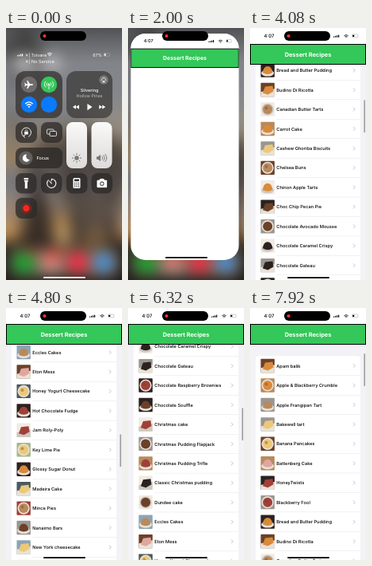
An HTML page that plays this animation: 146x316 px, repeating every 8 s.

```html
<!DOCTYPE html>
<html lang="en">
<head>
<meta charset="utf-8">
<title>Dessert Recipes</title>
<style>
  html, body { margin: 0; width: 100%; height: 100%; overflow: hidden; background: #444; }
  svg { display: block; width: 100vw; height: 100vh; }
  text { font-family: Inter, Roboto, sans-serif; text-rendering: geometricPrecision; }
</style>
</head>
<body>
<svg id="stage" viewBox="0 0 146 316"></svg>
<script>
const LOOP = 8000, STEP = 80, PITCH = 24.45;

// Name, then tile and food colours as letters of the palette.
const PALETTE = {
  k: '#2b2220', b: '#6b4128', t: '#b98a5c', o: '#d98a3a', y: '#ecc878', w: '#f0ebe4',
  g: '#9a9692', s: '#8ea4b4', r: '#a04038', p: '#e0a6a0', n: '#a8b88a', d: '#4a5a60'
};
const DESSERTS = `Apam balik bo;Apple & Blackberry Crumble to;Apple Frangipan Tart gt;Bakewell tart gy
Banana Pancakes by;Battenberg Cake tp;HoneyTwists kr;Blackberry Fool gr;Bread and Butter Pudding ko
Budino Di Ricotta bo;Canadian Butter Tarts wt;Carrot Cake to;Cashew Ghoriba Biscuits gy;Chelsea Buns bt
Chinon Apple Tarts wo;Choc Chip Pecan Pie kb;Chocolate Avocado Mousse gb;Chocolate Caramel Crispy wk
Chocolate Gateau gk;Chocolate Raspberry Brownies kr;Chocolate Souffle kb;Christmas cake wr
Christmas Pudding Flapjack gb;Christmas Pudding Trifle tr;Classic Christmas pudding wk;Dundee cake wb
Eccles Cakes st;Eton Mess bp;Honey Yogurt Cheesecake dy;Hot Chocolate Fudge kr;Jam Roly-Poly wr
Key Lime Pie ny;Glossy Sugar Donut ko;Madeira Cake dy;Mince Pies rt;Nanaimo Bars gb;New York cheesecake sy
Pancakes wo;Parkin Cake tb;Peach & Blueberry Grunt do;Peanut Butter Cheesecake by;Peanut Butter Cookies wt
Pear Tarte Tatin go;Portuguese Custard Tarts ky;Pumpkin Pie to;Rock Cakes wt`.split(/[;\n]/);

const rect = (x, y, w, h, r, fill, more = '') =>
  `<rect x="${x}" y="${y}" width="${w}" height="${h}" rx="${r}" fill="${fill}" ${more}/>`;
const dot = (x, y, r, fill, more = '') => `<circle cx="${x}" cy="${y}" r="${r}" fill="${fill}" ${more}/>`;
const oval = (x, y, rx, ry, fill) => `<ellipse cx="${x}" cy="${y}" rx="${rx}" ry="${ry}" fill="${fill}"/>`;
const path = (d, fill, more = '') => `<path d="${d}" fill="${fill}" ${more}/>`;
const line = (d, color = '#fff', w = .9) =>
  path(d, 'none', `stroke="${color}" stroke-width="${w}" stroke-linecap="round" stroke-linejoin="round"`);
const text = (x, y, s, size, fill, weight = 500, anchor = 'middle') =>
  `<text x="${x}" y="${y}" font-size="${size}" fill="${fill}" font-weight="${weight}" text-anchor="${anchor}">${s.replace('&', '&amp;')}</text>`;
const group = (id, body, more = '') => `<g id="${id}" ${more}>${body}</g>`;
const gradient = (id, stops) => `<linearGradient id="${id}" x2="0" y2="1">` +
  stops.map(([at, c, a = 1]) => `<stop offset="${at}" stop-color="${c}" stop-opacity="${a}"/>`).join('') +
  '</linearGradient>';

let seed = 11;
const rand = () => (seed = seed * 16807 % 2147483647) / 2147483647;

// Limbs are collected by depth, so each thickness is one path.
const limbs = Array(8).fill('');
function branch(x, y, angle, len, depth, spread = .4) {
  const x2 = x + Math.cos(angle) * len, y2 = y + Math.sin(angle) * len;
  limbs[depth] += `M${x.toFixed(1)} ${y.toFixed(1)}L${x2.toFixed(1)} ${y2.toFixed(1)}`;
  if (!depth) return;
  for (const turn of depth > 3 ? [-spread, 0, spread] : [-spread * .8, spread * .8]) {
    branch(x2, y2, angle + turn + (rand() - .5) * .4, len * (.68 + rand() * .2), depth - 1, spread);
  }
}

function conifer(x, top, bottom, reach) {
  let d = `M${x} ${top}V${bottom + 6}`;
  for (let y = top + 3; y < bottom; y += 1.5) {
    const w = 1 + (y - top) / (bottom - top) * reach;
    for (const side of [-1, 1]) {
      const tip = x + side * w * (.45 + rand() * .6);
      d += `M${x} ${y - w * .12}Q${(x + tip) / 2} ${y + w * .16} ${tip} ${y}`;
    }
  }
  return line(d, '#282320', 1.15);
}

const wifi = (x, y, c, k = 1) =>
  `<g transform="translate(${x} ${y}) scale(${k})">` +
  line('M-3.2 -1.5Q0 -4.3 3.2 -1.5M-1.8 0Q0 -1.6 1.8 0', c, 1) + dot(0, 1.5, .8, c) + '</g>';

const bars = (x, y, c) => [0, 1, 2, 3].map(i => rect(x + i * 2, y - 1.4 - i * .6, 1.2, 1.4 + i * .6, .3, c)).join('');

const battery = (x, y, c) => rect(x, y, 7.4, 3.8, 1.1, 'none', `stroke="${c}" stroke-width=".4" opacity=".5"`) +
  rect(x + .7, y + .7, 2, 2.4, .5, c);

const status = c => text(24, 12.2, '4:07', 6, c, 500) + bars(105, 11.8, c) + wifi(121, 10.6, c, .75) + battery(128.5, 8, c);

function wallpaper() {
  branch(108, 286, -1.57, 44, 7, .36);
  branch(107, 274, -2, 34, 5);
  branch(109, 274, -1.1, 34, 5);
  branch(-4, 96, -1.15, 24, 6, .5);
  branch(-6, 30, -.25, 13, 5, .5);
  branch(-6, 190, -1.3, 24, 5, .5);
  const wood = limbs.map((d, depth) => line(d, '#2b2623', .4 + depth * depth * .045)).join('');
  return rect(-40, -40, 226, 396, 0, 'url(#sky)') +
    '<g opacity=".6" style="filter:blur(4px)">' + oval(14, 164, 28, 6, '#e8bd80') + oval(60, 248, 56, 14, '#eaba74') +
    oval(130, 206, 34, 5, '#e8bd80') + oval(30, 197, 50, 9, '#83878f') + oval(50, 105, 60, 14, '#93969d') +
    oval(108, 195, 40, 72, '#4a4442') + oval(40, 250, 22, 36, '#4a4037') + '</g>' +
    wood + conifer(40, 174, 282, 33) + conifer(88, 226, 284, 16) + conifer(134, 232, 284, 18) +
    path('M-40 270Q20 264 60 272T186 258V356H-40Z', '#231f1e');
}

function home() {
  const blank = x => rect(x - 11, 32, 22, 22, 5, '#fbfbfb') +
    line(`M${x - 11} 43h22M${x} 32v22M${x - 10} 33l20 20M${x + 10} 33l-20 20M${x - 4} 32v22M${x + 4} 32v22`, '#d3d3d6', .35) +
    dot(x, 43, 7, 'none', 'stroke="#d3d3d6" stroke-width=".4"') + dot(x, 43, 3.5, 'none', 'stroke="#d3d3d6" stroke-width=".4"');
  const tile = (x, c) => rect(x - 11, 283, 22, 22, 5.2, c);
  const badge = (x, w, s) => rect(x - w / 2, 279.5, w, 8, 4, '#f5382f') + text(x, 285.5, s, 5.2, '#fff');
  return blank(23) + blank(56.5) +
    text(23, 59.5, 'Recipes', 4, '#fff') + text(56.5, 59.5, 'Dessert Challenge', 4, '#fff') +
    rect(60, 257, 26, 10, 5, '#ddd', 'opacity=".4"') + dot(65, 261.6, 1.2, 'none', 'stroke="#fff" stroke-width=".5"') +
    line('M65.9 262.5l1 1', '#fff', .5) + text(68.5, 263.7, 'Search', 4.4, '#fff', 500, 'start') +
    rect(4, 276, 138, 36, 13, '#c4b09c', 'opacity=".62"') +
    tile(23, '#35c759') + tile(56.5, '#fff') + dot(56.5, 294, 6.5, '#e5473c') +
    tile(90, '#f5405a') + tile(123, '#fff') + dot(123, 294, 9, '#2a8df0') +
    badge(31, 10, '40') + badge(60, 17, '9,421');
}

function controls() {
  const panel = (x, y, w, h, r = 8, a = .74) => rect(x, y, w, h, r, '#2b2827', `opacity="${a}"`);
  const slider = x => rect(x, 118, 26, 58, 8, 'url(#slide)');
  const rays = [0, 1, 2, 3, 4, 5, 6, 7].map(i => {
    const c = Math.cos(i * Math.PI / 4), s = Math.sin(i * Math.PI / 4);
    return `M${89 + c * 4.3} ${163 + s * 4.3}L${89 + c * 5.6} ${163 + s * 5.6}`;
  }).join('');
  const keys = [0, 1, 2].map(r => [0, 1, 2].map(c => dot(86.6 + c * 2.4, 194.4 + r * 2.3, .75, '#333')).join('')).join('');
  return bars(14, 35.4, '#fff') + text(24, 35.6, '✕| Tolvane', 5.3, '#fff', 400, 'start') + wifi(55, 33.5, '#fff', .85) +
    text(24, 43.9, '✕| No Service', 5.5, '#fff', 400, 'start') + text(115, 35.6, '67%', 5.4, '#fff', 400) + battery(123, 31.6, '#fff') +
    panel(12, 54, 59, 59, 12, .68) + panel(76, 54, 58, 59, 12, .6) +
    dot(29, 71, 10.2, '#6f6c6b') + dot(54, 71, 10.2, '#35c759') + dot(29, 96, 10.2, '#0a7aff') + dot(54, 96, 10.2, '#0a7aff') +
    path('M34 71q0-.9-1.3-.9h-2.6l-2.7-4h-1.2l1.2 4h-2l-1.2-1.4h-.9l.7 2.3-.7 2.3h.9l1.2-1.4h2l-1.2 4h1.2l2.7-4h2.6q1.3 0 1.3-.9Z', '#fff') +
    line('M54 70.5v6M51.8 72.6q-1.7-1.8 0-3.8M56.2 72.6q1.7-1.8 0-3.8M49.8 74.2q-3.2-3.4 0-7M58.2 74.2q3.2-3.4 0-7') + dot(54, 70.6, 1.1, '#fff') +
    wifi(29, 96.8, '#fff', 1.35) +
    dot(123, 65, 5.8, '#7a7877') + line('M120.8 66q-1-3.4 2.2-3.6q3.2.2 2.2 3.6', '#fff', .7) + path('M121 68.3l2-2.6l2 2.6Z', '#fff') +
    text(105, 80.3, 'Silvering', 5.4, '#fff', 500) + text(105, 87.2, 'Hollow Pines', 5.4, '#c4c1bf', 400) +
    path('M88 96.5v5.2l-4-2.6ZM92 96.5v5.2l-4-2.6ZM102.4 95v8.2l6.2-4.1ZM117.2 96.5v5.2l4-2.6ZM121.2 96.5v5.2l4-2.6Z', '#fff') +
    panel(12, 118, 27, 26) + panel(44, 118, 27, 26) + panel(12, 150, 59, 26) +
    line('M21.5 135.4a6 6 0 1 1 7 .9M23.8 137.2l-2.3-1.8l2.6-1') + rect(23.2, 130, 4.6, 3.6, .7, '#fff') + line('M24.2 130v-1a1.3 1.3 0 0 1 2.6 0v1', '#fff', .7) +
    rect(51.5, 127, 8.5, 6, 1.2, 'none', 'stroke="#fff" stroke-width=".8"') + rect(55, 129.5, 8.5, 6, 1.2, '#3c3938', 'stroke="#fff" stroke-width=".8"') +
    dot(25, 163, 8.6, '#62605f') + path('M26 158.6a4.6 4.6 0 1 0 3.8 6.5a4.2 4.2 0 0 1-3.8-6.5Z', '#fff') +
    text(38.5, 165, 'Focus', 5.4, '#fff', 500, 'start') +
    slider(76) + slider(107.5) + dot(89, 163, 2.7, '#777') + line(rays, '#777', 1) +
    path('M114 161.3h2l3-2.6v8.6l-3-2.6h-2Z', '#777') + line('M121 161q1.4 2 0 4M123 159.6q2.6 3.4 0 6.8M125 158.3q3.6 4.7 0 9.4', '#777', .9) +
    [12, 44, 76, 107.5].map(x => panel(x, 182, 26.5, 25.5)).join('') + panel(12, 213, 27, 26) +
    path('M22.6 188h5.6v2.2h-5.6ZM22.6 191h5.6l-1.2 2.6v7.6h-3.2v-7.6Z', '#fff') +
    line('M57.3 189.2a5.6 5.6 0 1 1-4 1.6M57.3 189.2v2.4M57.3 194.8l-2.6-2.8', '#fff', 1.1) +
    rect(84.5, 188, 9, 13, 1.6, '#fff') + rect(86, 189.6, 6, 2.6, .5, '#333') + keys +
    path('M115 191.2h2.6l1.2-1.8h4l1.2 1.8h2.6v8.4h-11.6Z', '#fff', 'stroke="#fff" stroke-linejoin="round"') + dot(120.8, 195.2, 2.6, '#333') + dot(120.8, 195.2, 1.7, '#fff') +
    dot(25.5, 226, 6, 'none', 'stroke="#a8241c" stroke-width="1"') + dot(25.5, 226, 4.2, '#f5281e') +
    rect(47, 312, 53, 1.8, .9, '#fff');
}

function thumb(y, tile, food, i) {
  const back = rect(13.5, y - 8.7, 17.4, 17.4, .8, PALETTE[tile]);
  const plate = tile === 'w' ? '#cfc8c0' : '#e9e2d8', main = PALETTE[food];
  if (i % 3 === 1) return back + dot(22.2, y, 7.6, plate) + dot(22.2, y, 6, main) + dot(20.5, y - 1.5, 2, PALETTE.b, 'opacity=".4"');
  if (i % 3 === 2) return back + oval(22.2, y + 3.5, 8, 4, plate) + path(`M16 ${y + 3}q1-8 6.2-8t6.2 8q-6 4-12.4 0Z`, main);
  return back + path(`M13.5 ${y + 8.7}v-6l17.4-4v10Z`, plate) + path(`M16 ${y + 4}l3-8l9.5-1l1 7l-7 4Z`, main);
}

function list() {
  const rows = DESSERTS.map((entry, i) => {
    const y = 72.5 + i * PITCH, cut = entry.lastIndexOf(' ');
    return thumb(y, entry[cut + 1], entry[cut + 2], i) +
      text(33.3, y + 2.1, entry.slice(0, cut), 5.7, '#000', 500, 'start') +
      line(`M130.2 ${y - 2}l2 2l-2 2`, '#b4b4b9', .8) +
      rect(33.3, y + PITCH / 2 - .2, 105.7, .4, 0, '#dcdce0');
  }).join('');
  return rect(0, 46, 146, 270, 0, '#f2f2f7') +
    group('rows', rect(7, 60.2, 132, DESSERTS.length * PITCH + 60, 4, '#fff') + rows) +
    rect(143.4, 57, 1.5, 41, .75, '#8c8c90', 'id="thumb"');
}

const app = () => rect(0, 0, 146, 330, 0, '#fff') + group('list', list()) +
  rect(0, 0, 146, 20, 0, '#fff') + rect(.5, 20.5, 145, 25, 0, '#34c759', 'stroke="#000"') +
  text(73, 35.8, 'Dessert Recipes', 7.4, '#fff', 700) + status('#000');

const stage = document.getElementById('stage');
stage.innerHTML = '<defs>' +
  gradient('sky', [[0, '#a0a1a4'], [.3, '#a6a8ad'], [.48, '#c2b6a4'], [.58, '#a09fa2'], [.72, '#bfa892'], [.79, '#e3b478'], [.88, '#b98450']]) +
  gradient('shade', [[0, '#000', .5], [.14, '#222', .26], [.5, '#222', .24], [.8, '#222', .2], [1, '#111', .2]]) +
  gradient('slide', [[0, '#fff', .96], [1, '#e4e2e0', .96]]) +
  '<clipPath id="window"><rect id="frame"/></clipPath></defs>' +
  group('home', wallpaper() + home()) + group('homeStatus', status('#fff')) +
  rect(0, 0, 146, 316, 0, 'url(#shade)', 'id="dim"') + group('controls', controls()) +
  group('opening', group('app', app()), 'clip-path="url(#window)"') +
  rect(47, 312.2, 53, 1.8, .9, '#000', 'id="bar"') +
  rect(43, 4, 58, 12, 6, '#000') + dot(48.5, 10, 2.1, '#f0372d');

const el = {};
stage.querySelectorAll('[id]').forEach(e => el[e.id] = e);
const set = (e, attrs) => Object.entries(attrs).forEach(([k, v]) => e.setAttribute(k, v));

// Each track is a list of [time, value, ...].
const TRACKS = {
  blur: [[80, 9], [720, 0], [1680, 0], [2000, 9]],
  dim: [[80, 1], [720, 0], [1680, 0], [2000, 1]],
  controls: [[80, 1], [560, 0]],
  status: [[400, 0], [800, .9], [1680, .9], [1840, 0]],
  window: [[1680, 45, 32, 67, 54, 5], [1760, 36, 27, 82, 100, 10], [1840, 20, 18, 108, 185, 15], [1920, 9, 11, 129, 255, 18],
    [2000, 3.3, 7, 139.7, 291, 19], [2080, 1.4, 3.2, 143.5, 305, 17], [2160, .4, 1, 145.5, 313, 12], [2240, 0, 0, 146, 316, 0]],
  scroll: [[3560, 0], [3760, 55], [4080, 215], [4480, 460], [4800, 652.7], [5120, 755], [5440, 785], [5680, 745],
    [6000, 605], [6320, 440], [6720, 245], [7120, 95], [7440, 25], [7760, 0]],
  knob: [[3560, 0], [3680, .9]]
};

function at(name, t) {
  const keys = TRACKS[name];
  if (t <= keys[0][0]) return keys[0].slice(1);
  const i = keys.findIndex(k => k[0] > t);
  if (i < 0) return keys[keys.length - 1].slice(1);
  const a = keys[i - 1], b = keys[i], p = (t - a[0]) / (b[0] - a[0]);
  return a.slice(1).map((v, j) => v + (b[j + 1] - v) * p);
}

function render(t) {
  const blur = at('blur', t)[0], shown = at('controls', t)[0], scroll = at('scroll', t)[0];
  el.home.style.filter = blur > 0 ? `blur(${blur}px) saturate(${1 + blur * .07})` : 'none';
  set(el.dim, { opacity: at('dim', t)[0] });
  set(el.homeStatus, { opacity: at('status', t)[0] });
  set(el.controls, { opacity: shown, transform: `translate(0 ${(shown - 1) * 14})` });

  const [l, top, r, bottom, radius] = at('window', t);
  set(el.frame, { x: l, y: top, width: r - l, height: bottom - top, rx: radius });
  set(el.app, { transform: `translate(${l} ${top}) scale(${(r - l) / 146})` });
  el.opening.style.display = t >= 1680 ? '' : 'none';
  el.home.style.display = t < 2240 ? '' : 'none';
  el.list.style.display = t >= 2480 ? '' : 'none';
  set(el.rows, { transform: `translate(0 ${-scroll})` });
  set(el.thumb, { y: 57 + scroll * .155, opacity: at('knob', t)[0] });
  el.bar.style.display = t >= 1840 ? '' : 'none';
  set(el.bar, { y: t < 2240 ? bottom - 4 : 312.2 });
}

function tick() {
  render(Math.floor(performance.now() % LOOP / STEP) * STEP);
  requestAnimationFrame(tick);
}
render(0);
requestAnimationFrame(tick);
</script>
</body>
</html>
```
